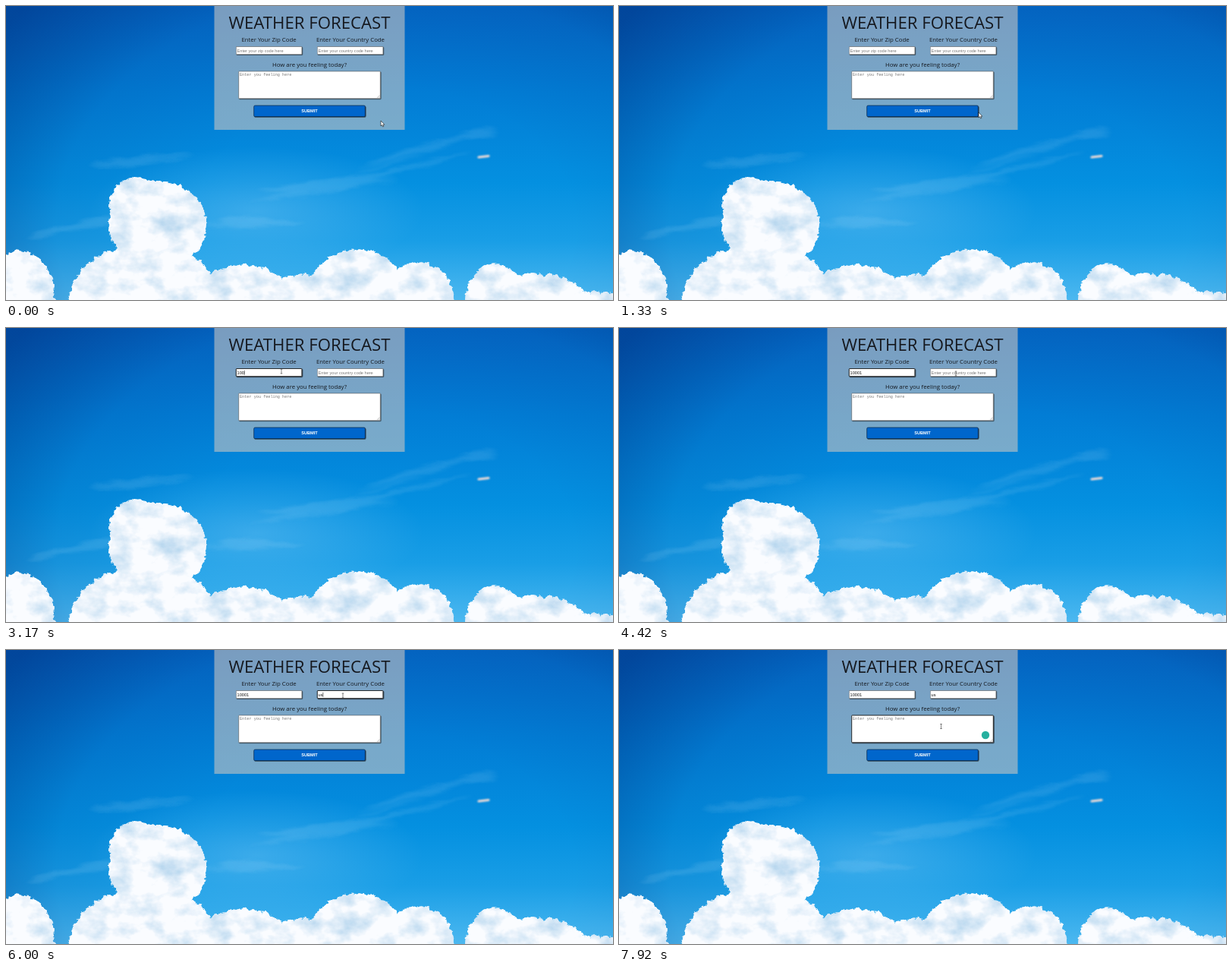
Write an HTML page that moves like this. It is 800 px wide and 387 px high and loops after 8000 ms.

```html
<!DOCTYPE html>
<html lang="en">
<head>
<meta charset="utf-8">
<title>Weather forecast form</title>
<style>
  html, body { margin: 0; height: 100%; overflow: hidden; background: #0b80d6; }
  svg { position: absolute; inset: 0; width: 100%; height: 100%; }
  .sky { will-change: transform; }
  text { white-space: pre; }
  .heading { font-family: "Open Sans", sans-serif; fill: #15181e; text-anchor: middle; }
  .small { font: 5.6px "Liberation Sans", Arial, sans-serif; fill: #111; }
  .mono { font: 5.2px "Liberation Mono", monospace; }
  .hint { fill: #777; }
  .submit { font-weight: bold; fill: #fff; text-anchor: middle; }
</style>
</head>
<body>
<svg class="sky" viewBox="0 0 800 387" preserveAspectRatio="none">
  <defs>
    <linearGradient id="air" x2="0" y2="1">
      <stop offset="0" stop-color="#0468c6"/>
      <stop offset=".3" stop-color="#027dd5"/>
      <stop offset=".6" stop-color="#0490e0"/>
      <stop offset=".8" stop-color="#199ee6"/>
      <stop offset="1" stop-color="#4cb8f0"/>
    </linearGradient>
    <radialGradient id="vignette" gradientUnits="userSpaceOnUse" cx="0" cy="0" r="1"
        gradientTransform="translate(500 290) scale(620 450)">
      <stop offset=".4" stop-color="#002a78" stop-opacity="0"/>
      <stop offset=".7" stop-color="#002a78" stop-opacity=".1"/>
      <stop offset="1" stop-color="#002a78" stop-opacity=".55"/>
    </radialGradient>
    <radialGradient id="haze">
      <stop offset="0" stop-color="#8fd0f8" stop-opacity=".35"/>
      <stop offset="1" stop-color="#8fd0f8" stop-opacity="0"/>
    </radialGradient>
    <filter id="wispy" x="0" y="100" width="800" height="287" filterUnits="userSpaceOnUse" color-interpolation-filters="sRGB">
      <feGaussianBlur stdDeviation="5 2" result="soft"/>
      <feTurbulence type="fractalNoise" baseFrequency=".02 .06" numOctaves="3" seed="4"/>
      <feDisplacementMap in="soft" scale="12" xChannelSelector="R" yChannelSelector="G"/>
    </filter>
    <filter id="fluffy" x="0" y="0" width="800" height="400" filterUnits="userSpaceOnUse" color-interpolation-filters="sRGB">
      <feTurbulence type="fractalNoise" baseFrequency=".1" numOctaves="3" seed="7" result="grain"/>
      <feDisplacementMap in="SourceGraphic" in2="grain" scale="8" xChannelSelector="R" yChannelSelector="G"/>
      <feGaussianBlur stdDeviation=".7" result="shape"/>
      <feTurbulence type="fractalNoise" baseFrequency=".03 .04" numOctaves="4" seed="12"/>
      <feColorMatrix values="0 0 0 0 .7  0 0 0 0 .83  0 0 0 0 .93  1.9 0 0 0 -.8"/>
      <feComposite in2="shape" operator="in" result="shade"/>
      <feMerge><feMergeNode in="shape"/><feMergeNode in="shade"/></feMerge>
    </filter>
    <filter id="blur" x="-50%" y="-200%" width="200%" height="500%"><feGaussianBlur stdDeviation=".8"/></filter>
  </defs>
  <rect width="800" height="387" fill="url(#air)"/>
  <rect width="800" height="387" fill="url(#vignette)"/>
  <ellipse cx="330" cy="270" rx="220" ry="85" fill="url(#haze)"/>
  <g id="wisps" fill="#c4e5fb" opacity=".14" filter="url(#wispy)"></g>
  <path d="M623 199L636 197.5" stroke="#f3dcd6" stroke-width="3" stroke-linecap="round" filter="url(#blur)"/>
  <g id="clouds" fill="#fafcff" filter="url(#fluffy)"></g>
</svg>

<svg viewBox="0 0 800 387" preserveAspectRatio="none">
  <defs>
    <filter id="lift" x="-10%" y="-10%" width="120%" height="130%">
      <feDropShadow dx="0" dy="1" stdDeviation="1.2" flood-color="#00305c" flood-opacity=".35"/>
    </filter>
    <filter id="drop" x="-5%" y="-20%" width="112%" height="160%">
      <feDropShadow dx=".8" dy=".8" stdDeviation=".5" flood-color="#000" flood-opacity=".7"/>
    </filter>
  </defs>
  <rect x="274.5" y="-9" width="251" height="172" fill="#c8c5c1" opacity=".6"/>
  <g class="heading">
    <text x="400" y="30" font-size="22.2">WEATHER FORECAST</text>
    <g font-size="7.8">
      <text x="346.5" y="47">Enter Your Zip Code</text>
      <text x="454" y="47">Enter Your Country Code</text>
      <text x="400" y="79.5">How are you feeling today?</text>
    </g>
  </g>
  <g id="fields"></g>
  <path d="M489 121l3.5-3.5M491 121l1.5-1.5" stroke="#888" stroke-width=".5"/>
  <rect x="326.7" y="131" width="146.6" height="14.6" rx="1.5" fill="#0066cc" stroke="#0a1c38" stroke-width=".6" filter="url(#drop)"/>
  <text class="small submit" x="400" y="140.2">SUBMIT</text>
  <g id="suggestion">
    <rect x="410" y="65" width="87.5" height="21.5" rx="1" fill="#fff" filter="url(#lift)"/>
    <text class="small" x="415" y="77.4">th</text>
  </g>
  <circle id="badge" cx="483" cy="112" r="5.2" fill="#27b09f"/>
  <path id="caret" stroke="#111" stroke-width=".6"/>
  <path id="arrow" d="M0 0V7L1.6 5.6L2.7 8L3.8 7.5L2.8 5.2H4.8Z" fill="#fff" stroke="#111" stroke-width=".6"/>
  <path id="beam" d="M-1.3-3H1.3M0-3V3M-1.3 3H1.3" fill="none" stroke="#333" stroke-width=".6"/>
</svg>

<script>
const LOOP = 8000, HORIZON = 388;
const $ = id => document.getElementById(id);

function add(parent, tag, attributes) {
  const node = document.createElementNS("http://www.w3.org/2000/svg", tag);
  for (const name in attributes) node.setAttribute(name, attributes[name]);
  return parent.appendChild(node);
}

let seed = 11;
const random = () => (seed = seed * 16807 % 2147483647) / 2147483647;
const between = (low, high) => low + (high - low) * random();

// A heap of cloud: an oval rimmed with seeded puffs.
function heap(x, top, halfWidth, base = HORIZON) {
  const height = base - top;
  add($("clouds"), "ellipse", { cx: x, cy: base, rx: halfWidth - 5, ry: height - 5 });
  const puffs = Math.round((halfWidth + height) / 3);
  for (let i = 0; i < puffs; i++) {
    const angle = i / puffs * 2 * Math.PI, r = between(5, 10);
    add($("clouds"), "circle", {
      cx: x + Math.cos(angle) * (halfWidth - r),
      cy: base + Math.sin(angle) * (height - r),
      r
    });
  }
}
heap(18, 322, 48);
heap(172, 225, 36, 262);
heap(200, 230, 65, 288);
heap(183, 313, 100);
heap(312, 340, 64);
heap(385, 353, 50);
heap(462, 320, 68);
heap(543, 337, 48);
heap(645, 339, 40);
heap(700, 351, 64);
heap(778, 376, 36);

// A wisp: seeded strands scattered along one line.
function wisp(x, y, length, angle) {
  const line = add($("wisps"), "g", { transform: `translate(${x} ${y}) rotate(${angle})` });
  for (let i = 0; i < 7; i++)
    add(line, "ellipse", {
      cx: between(-.25, .25) * length, cy: between(-.04, .04) * length,
      rx: between(.15, .35) * length, ry: between(1.5, 4.5)
    });
}
wisp(500, 212, 270, -16);
wisp(390, 240, 260, -8);
wisp(325, 284, 130, -3);
wisp(180, 201, 140, -4);
wisp(618, 168, 66, -4);
wisp(90, 292, 130, -12);

const fields = [
  { x: 303.3, y: 53.5, w: 86.6, h: 10.2, baseline: 60.8, font: "small", hint: "Enter your zip code here",
    focus: 2250, blur: 4700, text: "10001", typing: 2750, pace: 170 },
  { x: 410.3, y: 53.5, w: 86.6, h: 10.2, baseline: 60.8, font: "small", hint: "Enter your country code here",
    focus: 4700, blur: 7000, text: "us", typing: 5670, pace: 170 },
  { x: 306.7, y: 86, w: 186.6, h: 35.8, baseline: 92.2, font: "small mono", hint: "Enter you feeling here",
    focus: 7000, blur: LOOP, text: "", typing: LOOP, pace: 170 }
];
for (const f of fields) {
  f.box = add($("fields"), "rect", { x: f.x, y: f.y, width: f.w, height: f.h, rx: .6, fill: "#fff", filter: "url(#drop)" });
  f.label = add($("fields"), "text", { x: f.x + 1.3, y: f.baseline });
}

const moves = [
  { start: 500, end: 1100, x: 474, y: 140 },
  { start: 1500, end: 2050, x: 363, y: 57 },
  { start: 3750, end: 4250, x: 444, y: 60 },
  { start: 6100, end: 6600, x: 424.5, y: 100.5 }
];
function pointerAt(t) {
  let x = 494, y = 151;
  for (const move of moves) {
    const p = Math.min(1, Math.max(0, (t - move.start) / (move.end - move.start)));
    const eased = p * p * (3 - 2 * p);
    x += (move.x - x) * eased;
    y += (move.y - y) * eased;
  }
  return [x, y];
}

const show = (node, visible) => node.setAttribute("visibility", visible ? "visible" : "hidden");

function drawField(f, t) {
  const count = Math.min(f.text.length, Math.max(0, Math.floor((t - f.typing) / f.pace) + 1));
  const text = f.text.slice(0, count);
  const focused = t >= f.focus && t < f.blur;
  f.label.textContent = text || f.hint;
  f.label.setAttribute("class", f.font + (text ? "" : " hint"));
  f.box.setAttribute("stroke", focused ? "#1a1a1a" : "#444");
  f.box.setAttribute("stroke-width", focused ? .9 : .5);
  if (!focused) return;
  const changed = count ? f.typing + (count - 1) * f.pace : f.focus;
  const x = f.x + 1.3 + (text ? f.label.getComputedTextLength() + .3 : 0);
  $("caret").setAttribute("d", `M${x} ${f.baseline - 5}v6`);
  show($("caret"), (t - changed) % 1000 < 500);
}

function draw() {
  const t = performance.now() % LOOP;
  show($("caret"), false);
  fields.forEach(f => drawField(f, t));
  show($("suggestion"), t >= 5000 && t < 5670);
  show($("badge"), t >= 7330);

  const [x, y] = pointerAt(t);
  const overField = fields.some(f => x > f.x && x < f.x + f.w && y > f.y && y < f.y + f.h);
  for (const name of ["arrow", "beam"]) {
    $(name).setAttribute("transform", `translate(${x} ${y})`);
    show($(name), overField === (name === "beam"));
  }
  requestAnimationFrame(draw);
}
draw();
</script>
</body>
</html>
```
